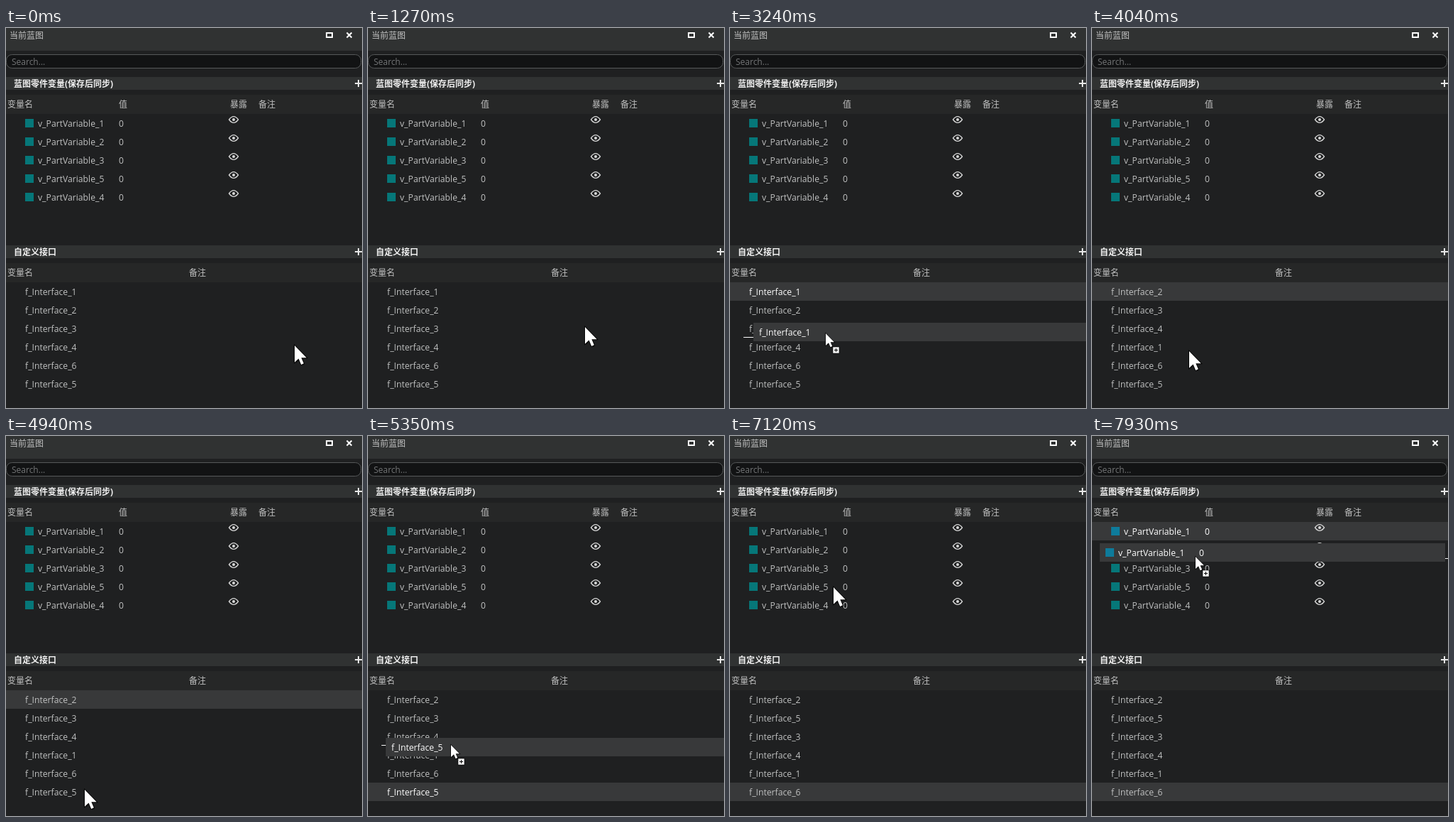
These frames come from a looping animation (502x535 px, 8 s). An HTML page:

```html
<!DOCTYPE html>
<html lang="zh-CN">
<head>
<meta charset="utf-8">
<title>当前蓝图</title>
<style>
  html, body { margin: 0; width: 100%; height: 100%; overflow: hidden; background: #1f2021; }
  svg { display: block; width: 502px; height: 535px; }
  text { font: 12px "Open Sans", "Noto Sans CJK SC", sans-serif; fill: #c0c1c1; white-space: pre; }
  .cell { font-size: 12.2px; }
  .bold { font-weight: 700; fill: #f0f0f0; }
  .hint { fill: #737576; }
  .active text { fill: #fff; }
  .swatch { fill: #067779; }
  .active .swatch { fill: #0e7b9b; }
  .band { fill: #38393a; }
</style>
</head>
<body>
<svg id="stage" viewBox="0 0 502 535">
  <defs>
    <path id="arrow" d="M0 0V17L4 13.3L6.6 19.2L9.2 18.1L6.7 12.3H12Z"/>
    <g id="eye" fill="none" stroke="#d8d8d8" stroke-width="1.3">
      <path d="M-6.5 0Q0 -8.8 6.5 0Q0 8.8 -6.5 0Z"/>
      <circle r="2" fill="#d8d8d8" stroke="none"/>
    </g>
    <path id="plus" d="M-5 0H5M0 -5V5" stroke="#e6e6e6" stroke-width="2"/>
  </defs>
  <rect width="502" height="535" fill="#1f2021"/>
  <rect width="502" height="32" fill="#303232"/>
  <text x="5" y="15">当前蓝图</text>
  <rect x="452" y="7" width="8" height="6" fill="none" stroke="#fff" stroke-width="2"/>
  <path d="M480.5 6.5L487.5 13.5M487.5 6.5L480.5 13.5" stroke="#fff" stroke-width="2"/>
  <rect x=".5" y="37.5" width="500" height="19" rx="8" fill="#121314" stroke="#565859"/>
  <text class="hint" x="8" y="52">Search...</text>

  <rect y="69" width="502" height="18" fill="#303232"/>
  <text class="bold" x="11" y="83">蓝图零件变量(保存后同步)</text>
  <use href="#plus" x="497" y="78"/>
  <rect y="94" width="502" height="27" fill="#262727"/>
  <text x="2" y="112">变量名</text>
  <text x="159" y="112">值</text>
  <text x="316" y="112">暴露</text>
  <text x="356" y="112">备注</text>

  <rect y="306" width="502" height="18" fill="#303232"/>
  <text class="bold" x="11" y="320">自定义接口</text>
  <use href="#plus" x="497" y="315"/>
  <rect y="331" width="502" height="27" fill="#262727"/>
  <text x="2" y="349">变量名</text>
  <text x="258" y="349">备注</text>

  <g id="rows"></g>
  <rect id="dropLine" x="19" width="487" height="1" fill="#fff"/>
  <g id="ghost" class="active"></g>
  <g id="cursor">
    <g id="pointer">
      <use href="#arrow" x="1" y="1" fill="#000" opacity=".45"/>
      <use href="#arrow" fill="#fff" stroke="#000" stroke-width="1.2" paint-order="stroke"/>
    </g>
    <g id="copyMark">
      <rect x="10" y="19" width="9" height="9" fill="#fff" stroke="#000" stroke-width=".6"/>
      <path d="M12 23.5H17M14.5 21V26" stroke="#000"/>
    </g>
  </g>
</svg>
<script>
const LOOP = 8000, TICK = 70, ROW = 26, INDENT = 19;
const $ = id => document.getElementById(id);
const TOP = { vars: 121, calls: 358 };

// Pointer tip: time, x, y, eased arrival
const path = [
  [0, 407, 447], [990, 407, 447], [1690, 121, 373, true],
  [2090, 121, 373], [2160, 123, 383], [2490, 123, 383], [2910, 130, 417],
  [3170, 130, 417], [3240, 135, 430], [3450, 137, 455],
  [4040, 137, 455], [4870, 111, 499, true], [4940, 111, 498],
  [5070, 111, 498], [5350, 117, 435], [5630, 124, 402], [5770, 127, 394],
  [6570, 127, 394], [7330, 154, 140, true],
  [7790, 154, 140], [7930, 146, 170], [LOOP, 146, 170]
];

// Each drag: press, lift and drop times, the list, the row and the grab point
const drags = [
  { press: 2090, lift: 2160, drop: 4040, list: 'calls', row: 0, grab: [121, 373] },
  { press: 5070, lift: 5140, drop: 6240, list: 'calls', row: 5, grab: [111, 498] },
  { press: 7790, lift: 7860, drop: LOOP, list: 'vars', row: 0, grab: [154, 140] }
];

// Order of the interface list from each time on
const orders = [[0, '123465'], [4040, '234165'], [6240, '253416']];
const variables = '12354';

const lastBefore = (table, t) => table.filter(e => e[0] <= t).pop();

function tipAt(t) {
  const i = path.findIndex(p => p[0] > t);
  const [t0, x0, y0] = path[i - 1], [t1, x1, y1, eased] = path[i];
  let k = Math.floor((t - t0) / TICK) * TICK / (t1 - t0);
  if (eased) k = k * k * (3 - 2 * k);
  return [Math.round(x0 + (x1 - x0) * k), Math.round(y0 + (y1 - y0) * k)];
}

const cell = (x, label) => `<text class="cell" x="${x}" y="18">${label}</text>`;

// Cells are laid out from the left edge of the row's item
function cells(list, id) {
  return list === 'calls'
    ? cell(8, `f_Interface_${id}`)
    : '<rect class="swatch" x="8" y="7" width="12" height="12"/>' +
      cell(26, `v_PartVariable_${id}`) + cell(140, 0);
}

function rowMarkup(list, id, i, selected, active) {
  return `<g class="${active ? 'active' : ''}" transform="translate(0 ${TOP[list] + i * ROW})">
    ${selected ? `<rect class="band" width="502" height="${ROW}"/>` : ''}
    <g transform="translate(${INDENT})">${cells(list, id)}</g>
    ${list === 'vars' ? '<use href="#eye" x="321" y="8"/>' : ''}</g>`;
}

let shownState = '';

function drawRows(order, pressed, current) {
  const state = [order, pressed.length, !!current].join();
  if (state === shownState) return;
  shownState = state;
  const draw = (list, ids) => {
    const pick = pressed.filter(d => d.list === list).pop();
    return [...ids].map((id, i) => {
      const selected = !!pick && pick.row === i;
      return rowMarkup(list, id, i, selected, selected && pick === current);
    }).join('');
  };
  $('rows').innerHTML = draw('vars', variables) + draw('calls', order);
  if (current) {
    const ids = current.list === 'vars' ? variables : order;
    $('ghost').innerHTML =
      `<rect class="band" width="487" height="${ROW}"/>` + cells(current.list, ids[current.row]);
  }
}

function render(t) {
  const [x, y] = tipAt(t);
  const pressed = drags.filter(d => t >= d.press);
  const current = pressed.find(d => t < d.drop);
  const lifted = !!current && t >= current.lift;
  drawRows(lastBefore(orders, t)[1], pressed, current);

  for (const id of ['dropLine', 'ghost', 'copyMark'])
    $(id).setAttribute('visibility', lifted ? 'visible' : 'hidden');
  $('cursor').setAttribute('transform', `translate(${x} ${y})`);
  $('pointer').setAttribute('transform', `scale(${lifted ? 1 : 1.4})`);

  if (lifted) {
    const top = TOP[current.list], [grabX, grabY] = current.grab;
    const left = INDENT + x - grabX;
    const ghostTop = top + current.row * ROW + y - grabY;
    $('ghost').setAttribute('transform', `translate(${left} ${ghostTop})`);
    const over = Math.floor((y - top) / ROW) * ROW + top;
    $('dropLine').setAttribute('y', y - over < ROW / 2 ? over : over + ROW - 1);
  }
}

function loop() {
  render(performance.now() % LOOP);
  requestAnimationFrame(loop);
}
loop();
</script>
</body>
</html>
```
